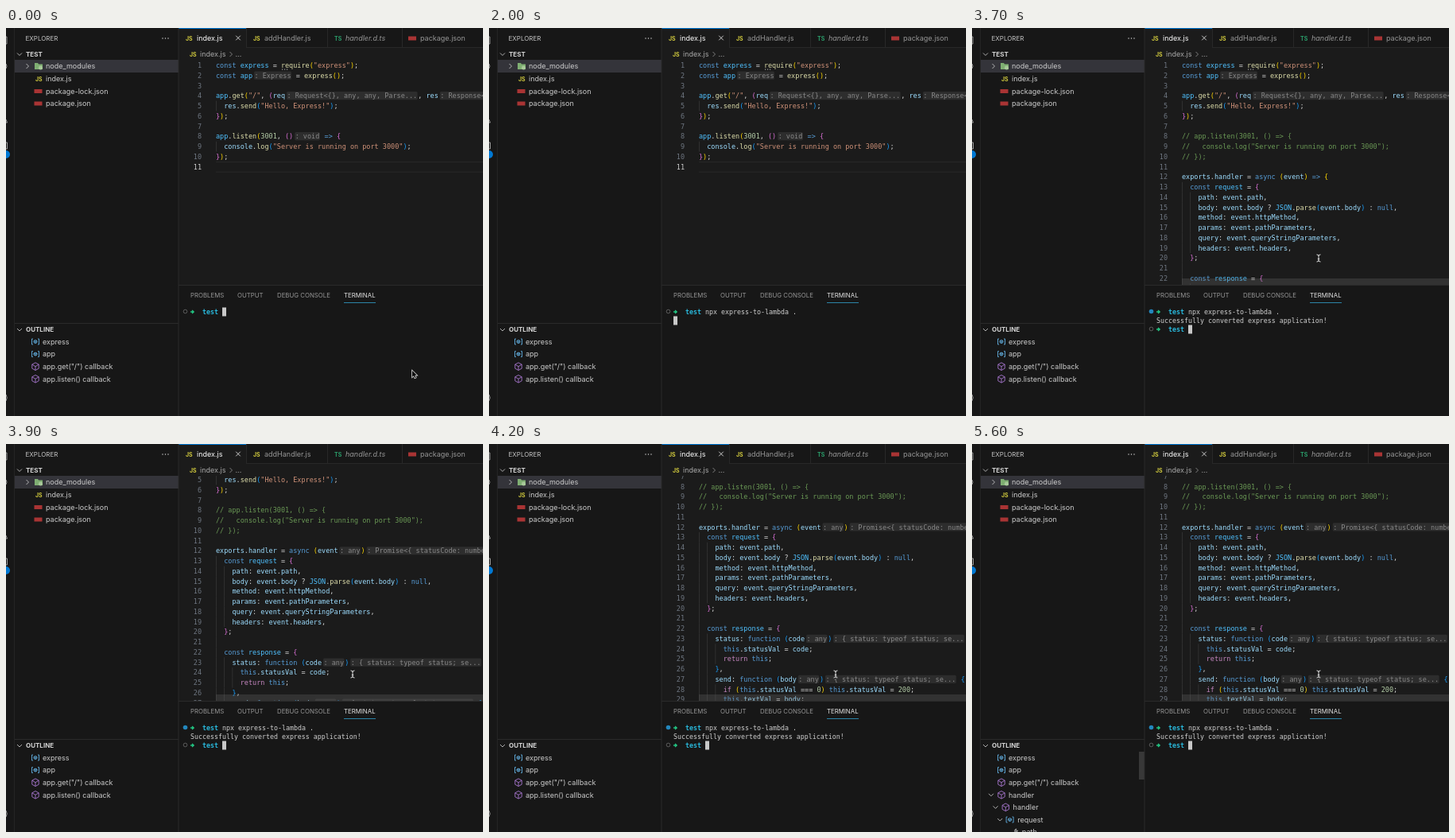
An HTML page with a canvas for the animation above (5.7 s loop, 600x488 px).

```html
<!DOCTYPE html>
<html lang="en">
<head>
<meta charset="utf-8">
<title>Converting an express app</title>
<style>
  html, body { margin: 0; width: 100%; height: 100%; overflow: hidden; background: #181818; }
  canvas { display: block; width: 600px; height: 488px; }
</style>
</head>
<body>
<canvas id="stage"></canvas>
<script>
const LOOP = 5700, STEP = 100;
const HIDE_MOUSE = 100, SUBMIT = 2000, CONVERTED = 2500, MOUSE_BACK = 3400;
const SCROLL_START = 3700, SCROLL_TIME = 500, SCROLL_BY = 82.8, HINTS = 3900, OUTLINE = 4800;

const canvas = document.getElementById("stage");
const ctx = canvas.getContext("2d");
const scale = window.devicePixelRatio || 1;
canvas.width = 600 * scale;
canvas.height = 488 * scale;
ctx.scale(scale, scale);

const UI = 'Inter, "Open Sans", sans-serif';
const MONO = '"DejaVu Sans Mono", monospace';
const CODE_FONT = `8.5px ${MONO}`;
ctx.font = CODE_FONT;
const CHAR = ctx.measureText("0").width;
const CODE_X = 264, LINE = 12.76, CELL = 5;

// Inlay hints are written between « and ».
const HEAD = `const express = require("express");
const app«: Express» = express();

app.get("/", (req«: Request<{}, any, any, Parse...», res«: Response<any, Record...») => {
  res.send("Hello, Express!");
});
`.split("\n");
const BEFORE = [...HEAD, ...`app.listen(3001, ()«: void» => {
  console.log("Server is running on port 3000");
});
`.split("\n")];
const AFTER = [...HEAD, ...`// app.listen(3001, () => {
//   console.log("Server is running on port 3000");
// });

exports.handler = async (event«: any»)«: Promise<{ statusCode: number...» => {
  const request = {
    path: event.path,
    body: event.body ? JSON.parse(event.body) : null,
    method: event.httpMethod,
    params: event.pathParameters,
    query: event.queryStringParameters,
    headers: event.headers,
  };
  
  const response = {
    status: function (code«: any»)«: { status: typeof status; se...» {
      this.statusVal = code;
      return this;
    },
    send: function (body«: any»)«: { status: typeof status; se...» {
      if (this.statusVal === 0) this.statusVal = 200;
      this.textVal = body;`.split("\n")];

const KEYWORDS = /^(const|async|function|this|null)$/;
const CONTROL = /^(return|if)$/;
const CONSTANTS = /^(express|app|request|response|JSON)$/;
const BRACKETS = ["#ffd700", "#da70d6", "#179fff"];
const TOKEN = /«.*?»|\/\/.*|"[^"]*"|[(){}]|\d+|[A-Za-z]\w*|=>|\s+|./g;

function rect(x, y, w, h, color) {
  ctx.fillStyle = color;
  ctx.fillRect(x, y, w, h);
}

function text(str, x, y, color, font) {
  ctx.font = font;
  ctx.fillStyle = color;
  ctx.fillText(str, x, y);
}

const label = (str, x, mid, color = "#cccccc", size = 9, style = "") =>
  text(str, x, mid + size * 0.36, color, `${style} ${size}px ${UI}`);

function stroke(path, x, y, color, width = 1) {
  ctx.save();
  ctx.translate(x, y);
  ctx.strokeStyle = color;
  ctx.lineWidth = width;
  ctx.stroke(new Path2D(path));
  ctx.restore();
}

function disc(x, y, r, color, filled = true) {
  ctx.beginPath();
  ctx.arc(x, y, r, 0, 7);
  ctx.fillStyle = ctx.strokeStyle = color;
  ctx.lineWidth = 0.9;
  filled ? ctx.fill() : ctx.stroke();
}

const chevronDown = (x, y) => stroke("M-3-1.5 0 1.5 3-1.5", x, y, "#c0c0c0", 0.9);
const chevronRight = (x, y, color = "#c0c0c0") => stroke("M-1.5-3 1.5 0-1.5 3", x, y, color, 0.9);
const badge = (name, x, y) => label(name, x, y + 0.3, name === "JS" ? "#d4cd3e" : "#2ba06c", 7, "bold");
const packageIcon = (x, y) => rect(x, y - 2.5, 10, 5, "#a93434");

function drawActivityBar() {
  stroke("M0 11H1V20H0 M0 45Q2 48 0 51 M0 115 1.5 119H0 M0 144H1.5V152H0 M0 461Q2.5 465 0 469", 0, 0, "#a0a0a0");
  disc(0, 159, 5, "#0078d4");
  rect(10, 0, 1, 488, "#242424");
}

function drawExplorer() {
  label("EXPLORER", 24.5, 13, "#c4c4c4", 8);
  for (const x of [197, 200.5, 204]) disc(x, 13, 0.75, "#cccccc");
  chevronDown(17, 33);
  label("TEST", 25, 33, "#d4d4d4", 8, "bold");
  rect(11, 40, 206, 16, "#34343a");
  chevronRight(27, 48);
  ctx.fillStyle = "#7fae72";
  ctx.fill(new Path2D("M36 44H40L41 45.5H46V52H36Z"));
  disc(43.5, 50, 2.5, "#a9c99a");
  label("node_modules", 50, 48);
  badge("JS", 37, 64);
  label("index.js", 50, 64);
  packageIcon(35.5, 79.5);
  label("package-lock.json", 50, 79.5);
  packageIcon(35.5, 95);
  label("package.json", 50, 95);
}

function drawSymbol(kind, x, y) {
  if (kind === "variable") {
    stroke("M-3-3.5H-4.5V3.5H-3 M3-3.5H4.5V3.5H3 M-2-1 0-2 2-1V1L0 2-2 1Z M-2-1 0 0 2-1 M0 0V2", x, y, "#63afe0", 0.9);
  } else if (kind === "method") {
    stroke("M0-4.8 4.2-2.5V2.5L0 4.8-4.2 2.5V-2.5Z M-4.2-2.5 0 0 4.2-2.5 M0 0V4.8", x, y, "#a877cf", 0.9);
  } else {
    stroke("M-3 4 1-0.5 M1-0.5Q0-3.5 3-4L2-2 3-1 4.5-2Q4 1 1-0.5", x, y, "#c0c0c0", 0.9);
  }
}

function drawOutline(expanded) {
  rect(11, 371, 206, 1, "#2b2b2b");
  chevronDown(17, 379.5);
  label("OUTLINE", 25, 379.5, "#d4d4d4", 8, "bold");
  const rows = [["express", "variable"], ["app", "variable"], ['app.get("/") callback', "method"]];
  if (expanded) {
    rows.push(["handler", "method", 0, true], ["handler", "method", 1, true],
      ["request", "variable", 2, true], ["path", "property", 3]);
    rect(210, 387, 7, 35, "#383838");
  } else {
    rows.push(["app.listen() callback", "method"]);
  }
  rows.forEach(([name, kind, level = 0, open], i) => {
    const y = 394.5 + 15.6 * i;
    if (open) chevronDown(24 + 5.6 * level, y);
    drawSymbol(kind, 37 + 5.3 * level, y);
    label(name, 46 + 5.6 * level, y);
  });
}

function drawTabs() {
  rect(217, 0, 383, 25, "#171717");
  rect(302, 24, 298, 1, "#282828");
  rect(217, 0, 85, 25, "#1b1b1b");
  rect(217, 0, 85, 1, "#0078d4");
  for (const x of [302, 404, 498]) rect(x, 0, 1, 25, "#282828");
  const grey = "#969696";
  badge("JS", 226, 13);
  label("index.js", 240, 13, "#ffffff");
  stroke("M-2.8-2.8 2.8 2.8 M2.8-2.8-2.8 2.8", 292, 12.5, "#dddddd", 0.9);
  badge("JS", 311, 13);
  label("addHandler.js", 325, 13, grey);
  badge("TS", 413, 13);
  label("handler.d.ts", 427, 13, grey, 9, "italic");
  packageIcon(506, 13);
  label("package.json", 521, 13, grey);
  badge("JS", 231, 33);
  label("index.js", 244, 33, "#a9a9a9");
  chevronRight(283, 33, "#8a8a8a");
  label("...", 288.5, 33, "#a9a9a9");
}

function wordColor(word, next) {
  if (KEYWORDS.test(word)) return "#569cd6";
  if (CONTROL.test(word)) return "#c586c0";
  if (next === "(") return "#dcdcaa";
  return CONSTANTS.test(word) ? "#4fc1ff" : "#9cdcfe";
}

function drawHint(str, x, y) {
  const width = str.length * CHAR;
  ctx.beginPath();
  ctx.roundRect(x + 2, y - 5.2, width + 0.8, 10.2, 1.5);
  ctx.fillStyle = "#2d2d2d";
  ctx.fill();
  text(str, x + 2.4, y + 3, "#888888", CODE_FONT);
  return width + 3.5;
}

function drawCode(lines, scroll, newHints) {
  let depth = 0;
  lines.forEach((line, i) => {
    const y = 47 + LINE * i - scroll;
    const number = String(i + 1);
    const current = lines === BEFORE && i === 10;
    text(number, 246 - number.length * CHAR, y + 3, current ? "#cccccc" : "#6e7681", CODE_FONT);
    if (current) {
      rect(CODE_X, y - 6.5, 336, 1, "#292929");
      rect(CODE_X, y + 6, 336, 1, "#292929");
    }
    const indent = line.match(/^ */)[0].length;
    for (let g = 0; g < indent; g += 2) rect(CODE_X + g * CHAR, y - 6.4, 0.8, LINE, "#353535");

    let x = CODE_X;
    for (const match of line.matchAll(TOKEN)) {
      const token = match[0];
      if (token[0] === "«") {
        if (i < 10 || newHints) x += drawHint(token.slice(1, -1), x, y);
        continue;
      }
      let color = "#d4d4d4";
      if (token.startsWith("//")) color = "#6a9955";
      else if (token[0] === '"') color = "#ce9178";
      else if (/[({]/.test(token[0])) color = BRACKETS[depth++ % 3];
      else if (/[)}]/.test(token[0])) color = BRACKETS[--depth % 3];
      else if (token === "=>") color = "#569cd6";
      else if (/\d/.test(token[0])) color = "#b5cea8";
      else if (/[a-z]/i.test(token[0])) color = wordColor(token, line[match.index + token.length]);
      if (token.trim()) text(token, x, y + 3, color, CODE_FONT);
      x += token.length * CHAR;
    }
  });
  for (const x of [347, 350, 353]) rect(x, 51.5 - scroll, 1.2, 1.2, "#a0a0a0");
}

function drawEditor(t) {
  const progress = Math.min(1, Math.max(0, (t - SCROLL_START) / SCROLL_TIME));
  const scroll = SCROLL_BY * (1 - (1 - progress) ** 2);
  ctx.save();
  ctx.beginPath();
  ctx.rect(217, 40, 383, 283);
  ctx.clip();
  drawCode(t < CONVERTED ? BEFORE : AFTER, scroll, t >= HINTS);
  if (t >= CONVERTED) rect(CODE_X, 315, 336, 8, "rgba(110,110,110,.27)");
  ctx.restore();
}

function typedCommand(t) {
  const command = "npx express-to-lambda .";
  const early = [200, 400, 500, 800].filter(at => t >= at).length;
  const late = Math.max(0, Math.floor((t - 900) / 50));
  return command.slice(0, early + late);
}

function drawTerminal(t) {
  const font = `${CELL / 0.602}px ${MONO}`;
  const left = 232;
  const rowY = row => 357 + 11 * row;
  const caret = (column, row) => rect(left + column * CELL, rowY(row) - 5.5, CELL, 11, "#c8c8c8");
  const prompt = (row, done) => {
    const y = rowY(row);
    disc(225.5, y - 0.5, done ? 2.8 : 2.3, done ? "#2387bd" : "#666666", done);
    stroke("M0 0H4 M2-2 4.2 0 2 2", left, y, "#23c884", 1.3);
    text("test", left + 3 * CELL, y + 3, "#29b8db", `bold ${font}`);
  };

  rect(217, 323, 383, 165, "#171717");
  rect(217, 323, 383, 1, "#2b2b2b");
  label("PROBLEMS", 232, 336.5, "#969696", 7.8);
  label("OUTPUT", 291, 336.5, "#969696", 7.8);
  label("DEBUG CONSOLE", 341, 336.5, "#969696", 7.8);
  label("TERMINAL", 425, 336.5, "#e4e4e4", 7.8);
  rect(425, 345, 40, 1, "#2c84a8");

  const converted = t >= CONVERTED;
  const command = typedCommand(t);
  prompt(0, converted);
  text(command, left + 8 * CELL, rowY(0) + 3, "#d0d0d0", font);
  if (converted) {
    text("Successfully converted express application!", left, rowY(1) + 3, "#d0d0d0", font);
    prompt(2, false);
    caret(8, 2);
  } else if (t >= SUBMIT) {
    caret(0, 1);
  } else {
    caret(8 + command.length, 0);
  }
}

function drawMouse(t) {
  if (t >= HIDE_MOUSE && t < MOUSE_BACK) return;
  const p = t < HIDE_MOUSE ? 0 : Math.min(1, (t - MOUSE_BACK + STEP) / 400);
  const x = 511 - 75 * p, y = 431 - 141.5 * p;
  if (y < 323) {
    const beam = "M-2.5-4.5Q0-4.5 0-3Q0-4.5 2.5-4.5 M0-3.5V3.5 M-2.5 4.5Q0 4.5 0 3Q0 4.5 2.5 4.5 M-1.2 1H1.2";
    stroke(beam, x, y, "#111111", 2);
    stroke(beam, x, y, "#e8e8e8", 1);
    return;
  }
  const arrow = "M0 0V8L1.9 6.3 3.2 9.3 4.6 8.7 3.3 5.8H5.8Z";
  stroke(arrow, x, y, "#e8e8e8", 1.5);
  ctx.save();
  ctx.translate(x, y);
  ctx.fillStyle = "#080808";
  ctx.fill(new Path2D(arrow));
  ctx.restore();
}

function draw(now) {
  const t = Math.floor((now % LOOP) / STEP) * STEP;
  rect(0, 0, 600, 488, "#171717");
  rect(217, 25, 383, 298, "#1b1b1b");
  drawActivityBar();
  drawExplorer();
  drawOutline(t >= OUTLINE);
  drawEditor(t);
  drawTabs();
  drawTerminal(t);
  rect(216.5, 0, 1, 488, "#2b2b2b");
  drawMouse(t);
  requestAnimationFrame(draw);
}
requestAnimationFrame(draw);
</script>
</body>
</html>
```
